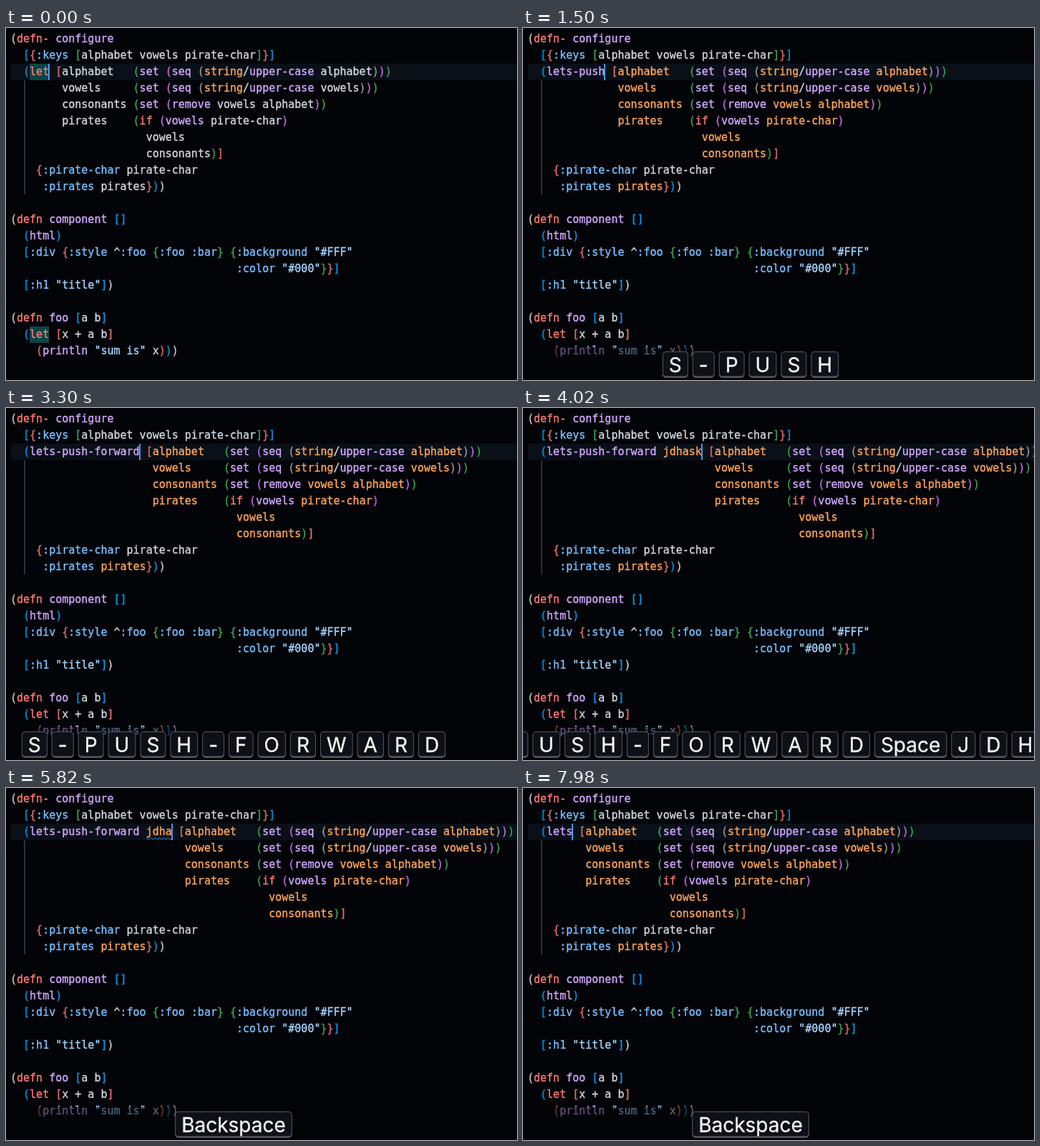
An HTML page with a canvas for the animation above (8000 ms loop, 714 by 493 pixels).

```html
<!DOCTYPE html>
<html lang="en">
<head>
<meta charset="utf-8">
<title>Editor typing</title>
<style>
  html, body { margin: 0; width: 100%; height: 100%; overflow: hidden; background: #030408; }
  canvas { display: block; }
</style>
</head>
<body>
<canvas id="stage" width="714" height="493"></canvas>
<script>
const ctx = document.getElementById('stage').getContext('2d');
const W = 714, H = 493, LOOP = 8000;
const LEFT = 6, CELL = 9.03, ROW = 23, BASE = 20;
const CODE_FONT = '15px "DejaVu Sans Mono", monospace';
const KEY_FONT = '28px Inter, sans-serif';

const BG = '#030408', PLAIN = '#d0d7de', RED = '#ff7b72', PURPLE = '#d2a8ff';
const ORANGE = '#ffa657', KEYWORD = '#79c0ff', STRING = '#a5d6ff', CURSOR = '#3b9cf0';
const RAINBOW = ['#cccccc', '#0098e6', '#e16d6d', '#3fa455', '#c968e6', '#999999'];
const SPECIAL = ['defn', 'defn-', 'let', 'if'];

// Typing: each press adds one letter after "let", then Backspace removes them.
const TYPED = 'lets-push-forward jdhaskdj';
const START = 3;
const presses = [150, 450, 740, 930, 1110, 1270, 1600, 1800, 1950, 2090, 2230, 2490,
  2640, 2800, 3400, 3620, 3700, 3780, 3860, 3925, 3985, 4080, 4170];
const erases = [5110];
for (let i = 0; i < 14; i++) erases.push(5618 + 84 * i);
erases.push(6825, 7000, 7180, 7360, 7520, 7700, 7880);

const REFLOW_LAG = 30, KEY_LAG = 110, KEY_EASE = 100;

const passed = (times, t) => times.filter(x => x <= t).length;
const lengthAt = t => START + passed(presses, t) - passed(erases, t);
const colX = col => LEFT + col * CELL;

// A thin outline gives the text a slightly heavier weight at the same width.
function write(text, x, y, color) {
  ctx.fillStyle = ctx.strokeStyle = color;
  ctx.lineWidth = 0.35;
  ctx.fillText(text, x, y);
  ctx.strokeText(text, x, y);
}

function codeLines(n, shown) {
  const pad = ' '.repeat(5 + shown);
  return [
    '(defn- configure',
    '  [{:keys [alphabet vowels pirate-char]}]',
    '  (' + TYPED.slice(0, n) + ' [alphabet   (set (seq (string/upper-case alphabet)))',
    pad + 'vowels     (set (seq (string/upper-case vowels)))',
    pad + 'consonants (set (remove vowels alphabet))',
    pad + 'pirates    (if (vowels pirate-char)',
    pad + ' '.repeat(13) + 'vowels',
    pad + ' '.repeat(13) + 'consonants)]',
    '    {:pirate-char pirate-char',
    '     :pirates pirates}))',
    '',
    '(defn component []',
    '  (html)',
    '  [:div {:style ^:foo {:foo :bar} {:background "#FFF"',
    ' '.repeat(35) + ':color "#000"}}]',
    '  [:h1 "title"])',
    '',
    '(defn foo [a b]',
    '  (let [x + a b]',
    '    (println "sum is" x)))'
  ];
}

function drawCode(lines, isCall) {
  ctx.font = CODE_FONT;
  let depth = 0, prev = '';
  lines.forEach((line, row) => {
    const put = (text, col, color) => write(text, colX(col), BASE + row * ROW, color);
    for (const m of line.matchAll(/"[^"]*"|[()[\]{}^]|:[\w-]+|[^\s()[\]{}^"]+/g)) {
      const token = m[0], col = m.index;
      if ('([{'.includes(token)) {
        put(token, col, RAINBOW[depth++ % RAINBOW.length]);
      } else if (')]}'.includes(token)) {
        put(token, col, RAINBOW[--depth % RAINBOW.length]);
      } else if (token[0] === '"') {
        put(token, col, STRING);
      } else if (token[0] === ':') {
        put(token, col, KEYWORD);
      } else if (token.includes('/')) {
        const cut = token.indexOf('/');
        put(token.slice(0, cut), col, ORANGE);
        put('/', col + cut, PLAIN);
        put(token.slice(cut + 1), col + cut + 1, PURPLE);
      } else if (prev === '(') {
        put(token, col, SPECIAL.includes(token) ? RED : PURPLE);
      } else if (prev.startsWith('defn')) {
        put(token, col, PURPLE);
      } else {
        const local = isCall && row >= 2 && row <= 9 && row !== 8;
        put(token, col, local ? ORANGE : PLAIN);
      }
      prev = token;
    }
  });
}

function drawSquiggle(from, to) {
  ctx.beginPath();
  for (let x = colX(from); x <= colX(to); x++) {
    ctx.lineTo(x, 71 + 1.2 * Math.sin(x * Math.PI / 3));
  }
  ctx.strokeStyle = CURSOR;
  ctx.lineWidth = 1;
  ctx.stroke();
}

function keysAt(t) {
  if (t >= erases[0]) return [{ label: 'Backspace', grow: 1 }];
  return presses
    .map((time, i) => {
      const ch = TYPED[START + i];
      const grow = Math.min(1, (t - time - KEY_LAG) / KEY_EASE);
      return { label: ch === ' ' ? 'Space' : ch.toUpperCase(), grow };
    })
    .filter(key => key.grow > 0);
}

function drawKey(label, x, width) {
  ctx.beginPath();
  ctx.roundRect(x, 453, width, 37, 5);
  ctx.fillStyle = '#555a62';
  ctx.fill();
  ctx.beginPath();
  ctx.roundRect(x + 1, 454, width - 2, 33.5, 4);
  ctx.fillStyle = '#0d1117';
  ctx.fill();
  write(label, x + 9, 482, '#f2f4f6');
}

function drawKeys(keys) {
  if (!keys.length) return;
  ctx.globalAlpha = 0.55 * keys[0].grow;
  ctx.fillStyle = BG;
  ctx.fillRect(0, 447, W, H - 447);
  ctx.font = KEY_FONT;
  const gap = 6;
  const widths = keys.map(key => ctx.measureText(key.label).width + 18);
  const total = keys.reduce((sum, key, i) => sum + (widths[i] + gap) * key.grow, -gap);
  let x = 318 - total / 2;
  keys.forEach((key, i) => {
    ctx.globalAlpha = key.grow;
    drawKey(key.label, x, widths[i]);
    x += (widths[i] + gap) * key.grow;
  });
  ctx.globalAlpha = 1;
}

function draw(t) {
  const n = lengthAt(t);
  ctx.fillStyle = BG;
  ctx.fillRect(0, 0, W, H);
  ctx.fillStyle = '#0a1018';
  ctx.fillRect(7, 50, W - 7, 23);
  ctx.fillStyle = '#26323f';
  ctx.fillRect(25, 73, 2, 160);

  if (n === START) {
    ctx.fillStyle = '#0b4545';
    ctx.fillRect(33, 50, 27, 23);
    ctx.fillRect(33, 418, 27, 23);
  }

  drawCode(codeLines(n, lengthAt(t - REFLOW_LAG)), n !== START);

  if (t > 2300 && t < 2800) drawSquiggle(13, 3 + n);
  if (t > 4400 && n >= 20) drawSquiggle(21, 3 + n);

  ctx.fillStyle = CURSOR;
  ctx.fillRect(Math.round(colX(3 + n)) - 1, 50, 2, 23);
  drawKeys(keysAt(t));
}

function frame() {
  draw(performance.now() % LOOP);
  requestAnimationFrame(frame);
}
frame();
</script>
</body>
</html>
```
